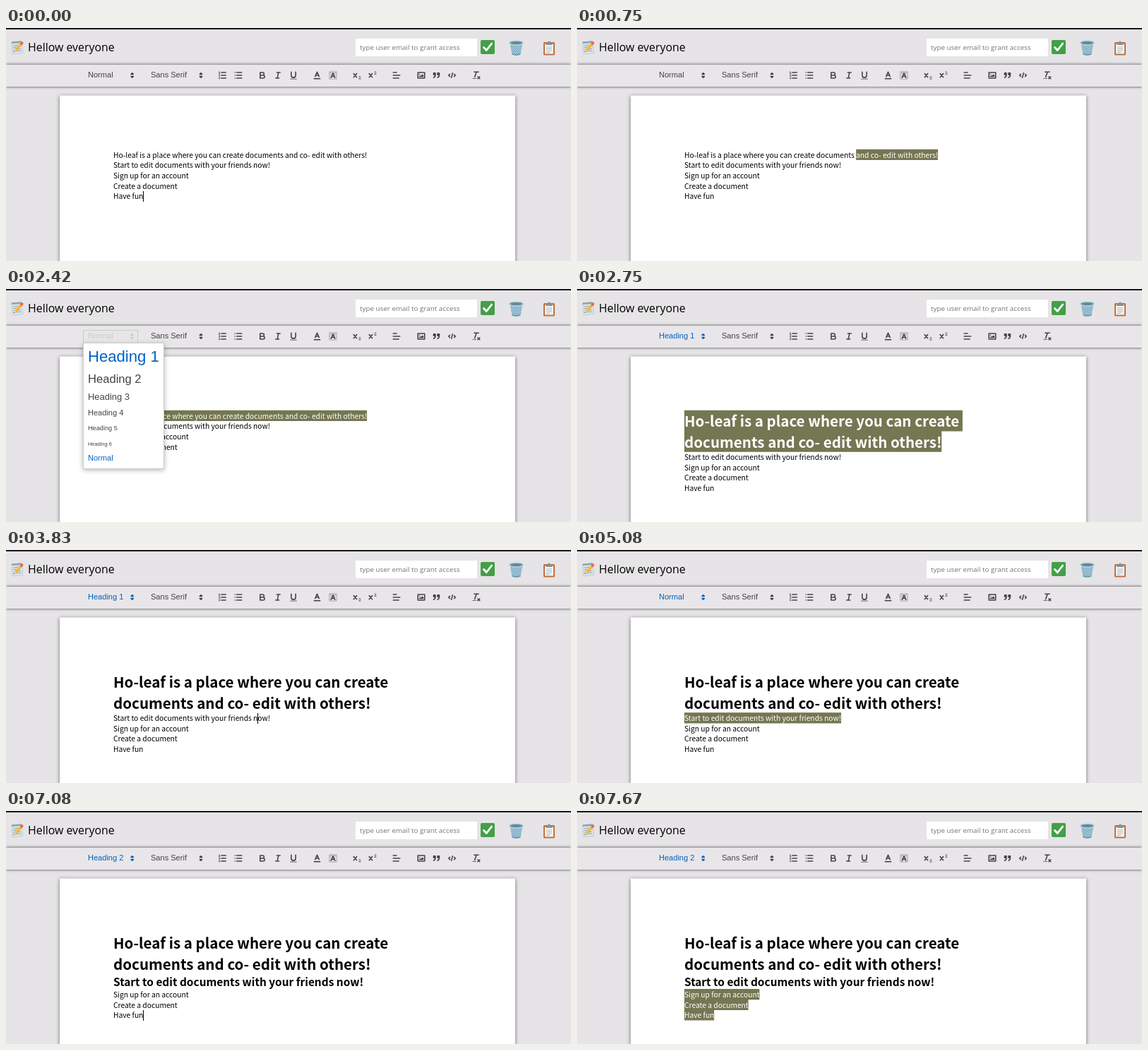
An HTML page with a canvas that plays this animation: 800 px wide and 330 px high, repeating every 8000 ms.

```html
<!DOCTYPE html>
<html lang="en">
<head>
<meta charset="utf-8">
<title>Document editor</title>
<style>
html, body { margin: 0; width: 100%; height: 100%; overflow: hidden; background: #e6e4e6; }
canvas { display: block; width: 800px; height: 330px; }
</style>
</head>
<body>
<canvas id="stage" width="800" height="330"></canvas>
<script>
const ctx = document.getElementById('stage').getContext('2d');
const LOOP = 8000;
const BODY = '"Noto Sans CJK SC", "Noto Sans CJK JP", "Noto Sans CJK", sans-serif';
const TITLE = '"Open Sans", "Noto Sans", sans-serif';
const UI = '"Liberation Sans", sans-serif';
const INK = '#444', BLUE = '#0062c4', UI_SIZE = 11.06, SCALE = 0.79;
const LEFT = 152, TOP = 172.2, EM = 10.28, LEADING = 1.42;

const INTRO = ['Ho-leaf is a place where you can create ', 'documents and co- edit with others!'];
const START = 'Start to edit documents with your friends now!';
const STEPS = ['Sign up for an account', 'Create a document', 'Have fun'];
const HEADINGS = [2, 1.5, 1.17, 1, 0.83, 0.67, 1];
const MENU_Y = [95, 127, 152.5, 175, 197, 219, 239.5];

function text(str, x, y, size, family, color, weight = 400) {
  ctx.font = `${weight} ${size}px ${family}`;
  ctx.fillStyle = color;
  ctx.fillText(str, x, y);
}

function rect(x, y, w, h, color) {
  ctx.fillStyle = color;
  ctx.fillRect(x, y, w, h);
}

function shadowRect(x, y, w, h, color, shadow, blur, dy = 0) {
  ctx.save();
  ctx.shadowColor = shadow;
  ctx.shadowBlur = blur;
  ctx.shadowOffsetY = dy;
  rect(x, y, w, h, color);
  ctx.restore();
}

function shape(path, fill, stroke, width = 1) {
  const p = new Path2D(path);
  if (fill) { ctx.fillStyle = fill; ctx.fill(p); }
  if (stroke) { ctx.strokeStyle = stroke; ctx.lineWidth = width; ctx.stroke(p); }
}

// Toolbar icons on an 18-unit grid: bold strokes, thin strokes, fills.
const cross = 'M3 6L8.5 12.5M8.5 6L3 12.5';
const two = y => `M12.5 ${y}c0-1.7 2.7-1.7 2.7 .2 0 1.6-2.7 1.8-2.7 3.3h3`;
const ICONS = [
  [306.5, 'M7 4H15M7 9H15M7 14H15',
    'M2.5 3L3.5 2.5V5.5M2.5 5.5H4.5M2.5 8.2c.4-1.1 1.9-.8 1.9 .1 0 1-1.9 1.9-1.9 2.2h2M2.5 13.1c.5-.9 1.9-.6 1.9 .2q0 .6-.7 .7 .7 0 .7 .8c-.2 .9-1.6 .9-1.9 0'],
  [329, 'M6 4H15M6 9H15M6 14H15M3 4H3.01M3 9H3.01M3 14H3.01'],
  [363, 'M5 4H9.5a2.5 2.5 0 0 1 0 5H5ZM5 9h5.5a2.5 2.5 0 0 1 0 5H5Z'],
  [385, 'M7 4H13M5 14H11M8 14L10 4'],
  [407, 'M5 3V9a4 4 0 0 0 8 0V3', '', 'M3 15h12v1H3Z'],
  [440.5, 'M5.5 11L9 3L12.5 11M6.4 9H11.6', '', 'M3 14h12v2H3Z'],
  [463, 'M5.5 13L9 5L12.5 13M6.4 11H11.6', '', ''],
  [497, cross, two(12)],
  [519, cross, two(3.5)],
  [553, 'M3 4H9M3 9H15M3 14H13'],
  [588, 'M3 4H15V14H3Z', '', 'M5 7a1 1 0 0 1 2 0a1 1 0 0 1-2 0M5 12V11L7 9L8 10L11 7L13 9V12Z'],
  [609.5, 'M4 5h3v3h-3ZM11 5h3v3h-3ZM7 8c0 4-3 5-3 5M14 8c0 4-3 5-3 5', '', 'M4 5h3v3h-3ZM11 5h3v3h-3Z'],
  [631.5, 'M5 7L3 9L5 11M13 7L15 9L13 11M10 5L8 13'],
  [666, 'M5 3H13M6 12L9.35 3M11.5 11.5L15 15M15 11.5L11.5 15', '', 'M2 14h7v1H2Z']
];

function drawIcon([x, bold, thin, fill]) {
  ctx.save();
  ctx.translate(x, 67);
  ctx.scale(SCALE, SCALE);
  ctx.translate(-9, -9);
  ctx.lineCap = ctx.lineJoin = 'round';
  shape(bold, null, INK, 2);
  if (thin) shape(thin, null, INK, 1);
  if (fill) shape(fill, INK);
  if (fill === '') {
    ctx.lineCap = 'butt';
    ctx.setLineDash([1, 1]);
    shape('M2.5 2.5H15.5V15.5H2.5ZM4 4.5H7M11 4.5H14M4 7.5H6M12 7.5H14', null, INK, 1);
  }
  ctx.restore();
}

function drawArrows(x, color) {
  ctx.save();
  ctx.translate(x, 67);
  ctx.scale(SCALE, SCALE);
  ctx.lineJoin = 'round';
  shape('M-2 2H2L0 4ZM-2 -2H2L0 -4Z', color, color, 2);
  ctx.restore();
}

function drawMemo() {
  ctx.save();
  ctx.translate(7, 18);
  shape('M1 2L15 .5L17 17.5L2 19Z', '#d9e4ea', '#b4c3cc', 0.7);
  shape('M1 1.5L15 .5V3L1 4Z', '#8fa3ae');
  shape('M3 7L13 6M3 9.7L12 8.8M3.5 12.4L14 11.4M3.5 15L14.5 14', null, '#7d98a8', 0.8);
  ctx.lineCap = 'round';
  shape('M6.5 13L14.5 4.5', null, '#f5a623', 3.6);
  shape('M5.6 13L14 4', null, '#ffd24d', 1.2);
  shape('M14.8 4.2L15.8 3.1', null, '#e8675b', 3.6);
  shape('M4 16L5 11.8L8.2 14.8Z', '#f2cf9c');
  shape('M4 16L4.4 14.4L5.5 15.5Z', '#333');
  ctx.restore();
}

function drawCheck() {
  ctx.beginPath();
  ctx.roundRect(672, 17, 20, 20, 2);
  ctx.fillStyle = '#43a047';
  ctx.fill();
  ctx.save();
  ctx.lineCap = ctx.lineJoin = 'round';
  shape('M676.5 27.5L680.3 31.5L687.7 22', null, '#fff', 2.8);
  ctx.restore();
}

function drawBin() {
  ctx.save();
  ctx.translate(712, 17);
  shape('M1.5 4L4.5 20Q10.5 23.5 16.5 20L19.5 4Z', '#a9cbdc');
  ctx.save();
  ctx.clip(new Path2D('M1.5 4L4.5 20Q10.5 23.5 16.5 20L19.5 4Z'));
  for (let i = -20; i < 24; i += 3.4) {
    shape(`M${i} 4l18 19M${i + 18} 4l-18 19`, null, '#6f9fb8', 0.7);
  }
  ctx.restore();
  shape('M4.5 19.5Q10.5 22.5 16.5 19.5', null, '#6a98b0', 1.4);
  shape('M.8 4a9.7 3 0 0 1 19.4 0a9.7 3 0 0 1-19.4 0', '#668899', '#b9d7e4', 1.5);
  ctx.restore();
}

function drawClipboard() {
  ctx.save();
  ctx.translate(761, 18);
  ctx.beginPath();
  ctx.roundRect(0, 2, 16, 18.5, 1.5);
  ctx.fillStyle = '#c2703d';
  ctx.fill();
  rect(2, 4.5, 12, 14, '#f3f5f6');
  shape('M4 9H12M4 11.5H12M4 14H12M4 16.4H9', null, '#8fa9b8', 0.8);
  shape('M3.5 6V3.5H6Q6 .5 8 .5Q10 .5 10 3.5H12.5V6Z', '#84939b');
  ctx.restore();
}

function drawChrome() {
  rect(0, 0, 800, 330, '#e6e4e6');
  shadowRect(76, 95.5, 645, 260, '#fff', 'rgba(0,0,0,.55)', 5);
  shadowRect(0, 52, 800, 31, '#e8e6e8', 'rgba(0,0,0,.75)', 4);
  rect(0, 0, 800, 2, '#1d1820');
  text('Hellow everyone', 31, 33, 15.9, TITLE, '#000');
  rect(495, 15, 172, 25, '#fff');
  text('type user email to grant access', 501, 31, 9.86, TITLE, '#757575');
  drawMemo();
  drawCheck();
  drawBin();
  drawClipboard();
  ICONS.forEach(drawIcon);
  text('Sans Serif', 205, 70.3, UI_SIZE, UI, INK);
  drawArrows(276, INK);
}

function layout(t) {
  const h1 = t >= 2750, h2 = t >= 6250;
  const rows = h1 ? INTRO.map(s => [s, 2]) : [[INTRO.join(''), 1]];
  rows.push([START, h2 ? 1.5 : 1], ...STEPS.map(s => [s, 1]));
  let y = TOP;
  return rows.map(([str, em]) => {
    const size = EM * em, height = size * LEADING;
    const line = { str, size, weight: em > 1 ? 700 : 400, y, height };
    line.base = y + height / 2 + size * 0.42;
    y += height;
    return line;
  });
}

// Selected ranges as [line, first character, end character].
function selection(t) {
  if (t < 500) return [];
  if (t < 2750) {
    const length = INTRO.join('').length;
    const step = Math.min(9, Math.floor((t - 495) / 83));
    return [[0, Math.round(length * (1 - step / 9))]];
  }
  if (t < 3830) return [[0, 0], [1, 0]];
  if (t < 3910) return [];
  if (t < 4000) return [[2, START.length - 4, START.length - 1]];
  if (t < 7080) return [[2, 0]];
  if (t < 7250) return [];
  if (t < 7330) return [[5, 6]];
  if (t < 7420) return [[5, 4]];
  if (t < 7500) return [[4, 5], [5, 0]];
  if (t < 7670) return [[4, 2], [5, 0]];
  return [[3, 0], [4, 0], [5, 0]];
}

function caret(t) {
  if (t < 500) return [4, STEPS[2].length];
  if (t < 580) return [0, INTRO.join('').length];
  if (t >= 3830 && t < 3910) return [2, START.length - 3];
  if (t >= 7080 && t < 7250) return [5, STEPS[2].length];
  return null;
}

function charX(line, index) {
  ctx.font = `${line.weight} ${line.size}px ${BODY}`;
  return LEFT + ctx.measureText(line.str.slice(0, index)).width;
}

function drawDocument(t) {
  const lines = layout(t);
  const write = (line, color) => text(line.str, LEFT, line.base, line.size, BODY, color, line.weight);
  for (const line of lines) write(line, '#000');
  for (const [index, from, to] of selection(t)) {
    const line = lines[index];
    const x = charX(line, from), end = charX(line, to ?? line.str.length);
    ctx.save();
    ctx.beginPath();
    ctx.rect(x, line.y - 0.4, end - x, line.height + 0.6);
    ctx.clip();
    rect(x, line.y - 1, end - x, line.height + 2, '#757652');
    write(line, '#fff');
    ctx.restore();
  }
  const mark = caret(t);
  if (mark) {
    const line = lines[mark[0]];
    rect(Math.round(charX(line, mark[1])), Math.round(line.y), 1, 15, '#000');
  }
}

function drawPicker(t) {
  const open = (t >= 2000 && t < 2750) || (t >= 5250 && t < 6250);
  const hover = (t >= 1830 && t < 2000) || (t >= 5080 && t < 5250);
  const heading = t >= 6250 ? 2 : t >= 2750 && t < 4000 ? 1 : 0;
  const color = open ? '#ccc' : hover || heading ? BLUE : INK;
  text(heading ? `Heading ${heading}` : 'Normal', 116, 70.3, UI_SIZE, UI, color);
  drawArrows(178.7, color);
  if (!open) return;

  ctx.strokeStyle = '#ccc';
  ctx.lineWidth = 1;
  ctx.strokeRect(109.5, 58.5, 77, 18);
  shadowRect(109, 76, 115, 179, '#ccc', 'rgba(0,0,0,.3)', 7, 1.5);
  rect(110, 77, 113, 177, '#fff');
  const active = t >= 5830 ? 1 : t >= 5670 || (t >= 2420 && t < 2750) ? 0 : -1;
  HEADINGS.forEach((em, i) => {
    const size = UI_SIZE * em, normal = i === 6;
    text(normal ? 'Normal' : `Heading ${i + 1}`, 116, MENU_Y[i] + size * 0.36, size, UI,
      normal || i === active ? BLUE : INK);
  });
}

function frame(now) {
  const t = now % LOOP;
  drawChrome();
  drawDocument(t);
  drawPicker(t);
  requestAnimationFrame(frame);
}
requestAnimationFrame(frame);
</script>
</body>
</html>
```
